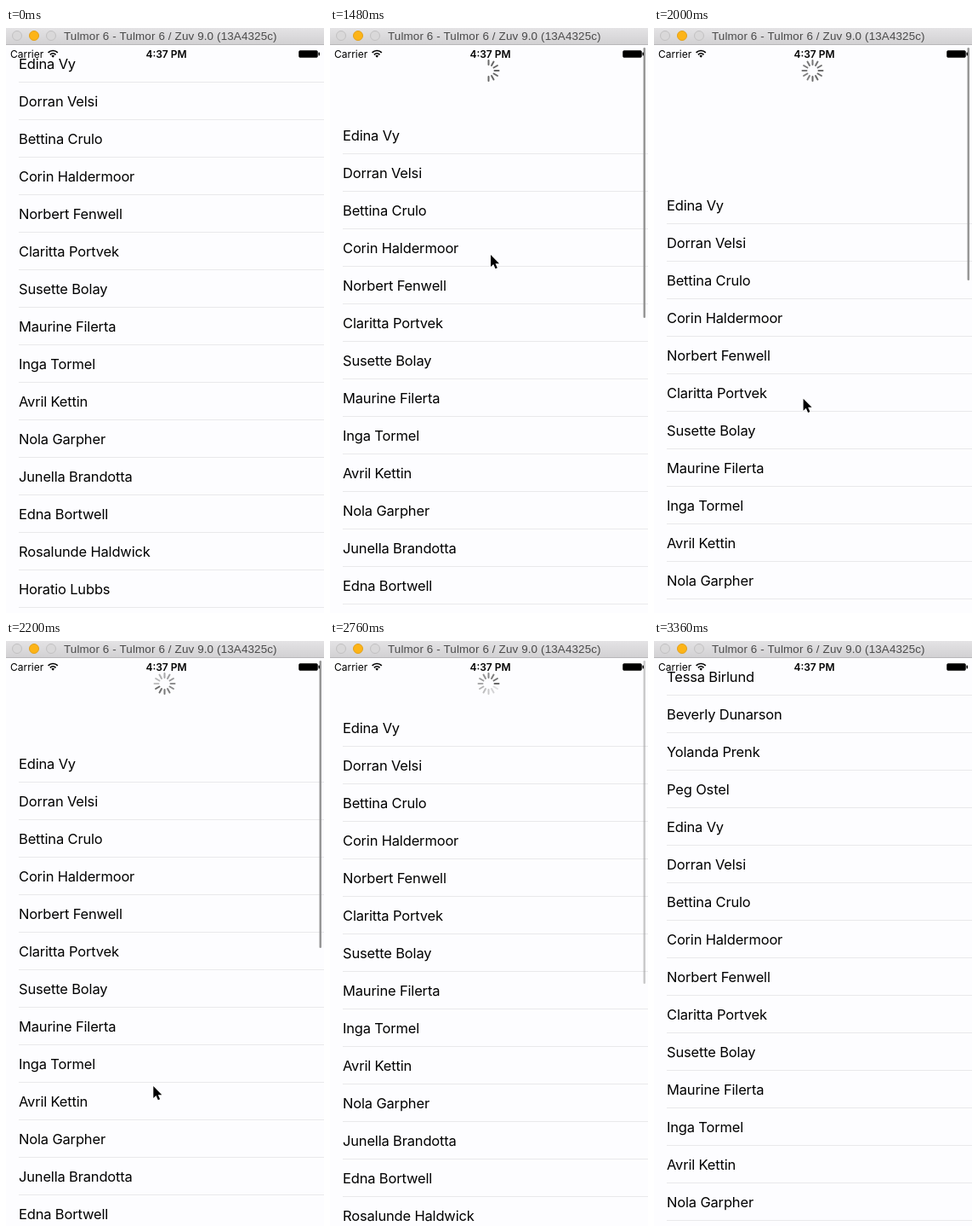
An HTML page that plays this animation: 374 by 686 pixels, repeating every 3.4 s.

```html
<!DOCTYPE html>
<html lang="en">
<head>
<meta charset="utf-8">
<title>Pull to refresh</title>
<style>
  html, body { margin: 0; width: 100%; height: 100%; overflow: hidden; background: #fdfdff; }
  svg { display: block; font-family: Inter, Roboto, sans-serif; }
  .row text { font-size: 16.5px; letter-spacing: -.17px; }
  .status { font-size: 12px; }
  .title { font: 13.4px "Liberation Sans", Arial, sans-serif; letter-spacing: .14px; fill: #4a4a4a; }
</style>
</head>
<body>
<svg width="374" height="686" viewBox="0 0 374 686">
  <defs>
    <linearGradient id="bar" x2="0" y2="1">
      <stop stop-color="#e4e3e5"/>
      <stop offset="1" stop-color="#d1d0d2"/>
    </linearGradient>
  </defs>
  <rect width="374" height="686" fill="#fdfdff"/>
  <g id="spinner" transform="translate(186.5 50)" stroke="#686868" stroke-width="2" stroke-linecap="round"></g>
  <g id="list"><g id="fresh"></g><g id="base"></g></g>
  <rect id="thumb" x="368.5" y="23" width="2.5" rx="1.25" fill="#979797"/>

  <g class="status">
    <text x="5" y="34.5">Carrier</text>
    <text x="188.5" y="34.5" font-weight="600" text-anchor="middle">4:37 PM</text>
    <g fill="none" stroke="#000" stroke-width="1.7">
      <path d="M49.6 28.8a8 8 0 0 1 11.2 0M51.9 31.3a4.7 4.7 0 0 1 6.6 0"/>
      <path d="M53.4 32.8a2.5 2.5 0 0 1 3.6 0L55.2 34.8Z" fill="#000" stroke="none"/>
    </g>
    <rect x="344.5" y="26.5" width="22" height="8" rx="1.5" stroke="#000" stroke-opacity=".5"/>
    <rect x="367.5" y="28.5" width="1.5" height="4" rx=".7"/>
  </g>

  <rect width="374" height="20" fill="url(#bar)"/>
  <rect y="19" width="374" height="1" fill="#b8b7b9"/>
  <g stroke-width="1">
    <circle cx="13" cy="9" r="5.5" fill="#d9d8d9" stroke="#c2c1c2"/>
    <circle cx="33" cy="9" r="5.5" fill="#fdb417" stroke="#e3a11a"/>
    <circle cx="53" cy="9" r="5.5" fill="#d9d8d9" stroke="#c2c1c2"/>
  </g>
  <text class="title" x="68" y="14">Tulmor 6 - Tulmor 6 / Zuv 9.0 (13A4325c)</text>

  <path id="cursor" d="M0 0V14L3.2 11 5.5 16.3 7.8 15.3 5.5 10.2H10Z" stroke="#fff" stroke-width="1.6" paint-order="stroke"/>
</svg>
<script>
const LOOP = 3400, STEP = 40, ROW = 44, TOP = 20, REST = 60;
const GRAB = 1160, RELEASE = 2060, LOADED = 2920;

const freshNames = ["Tessa Birlund", "Beverly Dunarson", "Yolanda Prenk", "Peg Ostel"];
const baseNames = [
  "Edina Vy", "Dorran Velsi", "Bettina Crulo", "Corin Haldermoor", "Norbert Fenwell",
  "Claritta Portvek", "Susette Bolay", "Maurine Filerta", "Inga Tormel", "Avril Kettin",
  "Nola Garpher", "Junella Brandotta", "Edna Bortwell", "Rosalunde Haldwick", "Horatio Lubbs"
];

const $ = id => document.getElementById(id);
const clamp = v => Math.min(1, Math.max(0, v));
const ramp = (t, from, to) => clamp((t - from) / (to - from));
const easeOut = u => 1 - (1 - u) ** 3;
const smooth = u => u * u * (3 - 2 * u);

const rows = (names, first) => names.map((name, i) => `
  <g class="row" transform="translate(0 ${TOP + (first + i) * ROW})">
    <rect width="374" height="${ROW}" fill="#fdfdff"/>
    <rect x="15" y="43" width="359" height="1" fill="#e9e9eb"/>
    <text x="15" y="28">${name}</text>
  </g>`).join("");
$("fresh").innerHTML = rows(freshNames, -freshNames.length);
$("base").innerHTML = rows(baseNames, 0);

$("spinner").innerHTML = Array.from({ length: 12 }, (_, i) =>
  `<path d="M0-7V-12" transform="rotate(${i * 30})"/>`).join("");
const petals = [...$("spinner").children];

// Distance the pointer has dragged since the grab
function dragAt(t) {
  const u = ramp(t, GRAB, RELEASE);
  return 316 * (u + .265 * u * (1 - u));
}

// Rubber-band resistance
const band = x => x / (1.385 + .00141 * x);

function offsetAt(t) {
  if (t >= LOADED) return REST * (1 - easeOut(ramp(t, LOADED, LOADED + 320)));
  const pulled = band(dragAt(t));
  if (t < RELEASE) return pulled;
  const w = (t - RELEASE) * .0152;
  return REST + (pulled - REST) * (1 + w) * Math.exp(-w);
}

function drawCursor(t) {
  const drag = dragAt(t), enter = easeOut(ramp(t, 680, 960)), leave = smooth(ramp(t, RELEASE + 40, 2380));
  const x = 190.5 - 15 * (drag / 301) ** 2.8 + 10 * (1 - enter);
  const y = 134.5 + drag - 156 * (1 - enter) + 245 * leave;
  $("cursor").setAttribute("transform", `translate(${x} ${y})`);
}

function drawSpinner(t, offset) {
  const shown = t < RELEASE ? Math.floor((offset - 20) * .12) : 12;
  const lead = Math.floor(t * .012) + 6;
  const spin = ramp(t, 1920, 2300);
  petals.forEach((petal, i) => {
    const age = (lead - i + 120) % 12;
    petal.style.opacity = i < shown ? 1 - spin * .8 * age / 11 : 0;
  });
  $("spinner").style.opacity = 1 - ramp(t, LOADED, LOADED + 240);
}

function drawThumb(t, offset) {
  const end = t < RELEASE ? Math.max(296, 424 - offset) : 462 - offset;
  $("thumb").setAttribute("height", end - 23);
  $("thumb").style.opacity = ramp(t, GRAB, GRAB + 80) * (1 - ramp(t, 2640, 2880));
}

function draw(now) {
  const t = Math.floor(now % LOOP / STEP) * STEP;
  const offset = Math.round(offsetAt(t));
  const loaded = t >= LOADED;
  $("fresh").style.display = loaded ? "" : "none";
  $("list").setAttribute("transform", `translate(0 ${offset + (loaded ? freshNames.length * ROW : 0)})`);
  drawSpinner(t, offset);
  drawThumb(t, offset);
  drawCursor(t);
}

let start;
function tick(now) {
  start ??= now;
  draw(now - start);
  requestAnimationFrame(tick);
}
draw(0);
requestAnimationFrame(tick);
</script>
</body>
</html>
```
